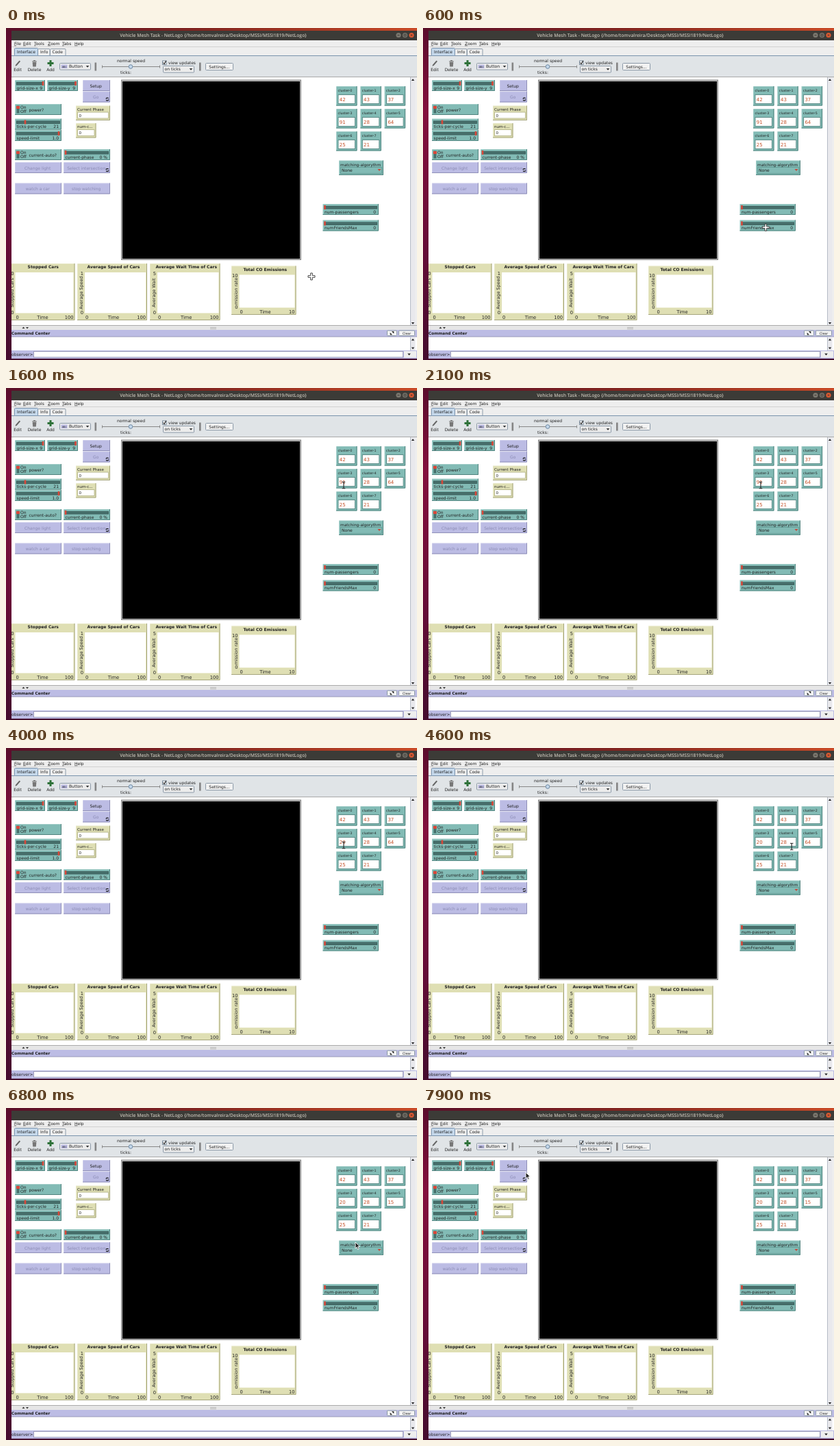
Recreate the animation shown at these times as an HTML page. Size 600x485 px, loop 8000 ms.

```html
<!DOCTYPE html>
<html lang="en">
<head>
<meta charset="utf-8">
<title>Interface</title>
<style>
html, body { margin: 0; width: 100%; height: 100%; overflow: hidden; background: #fff; }
svg { display: block; width: 600px; height: 485px; }
text { font: 6px "DejaVu Sans", sans-serif; fill: #222; text-rendering: geometricPrecision; white-space: pre; }
.title { font: 600 6.75px "Open Sans", sans-serif; fill: #c6c2b7; }
.bold { font-weight: bold; }
.off { fill: #8b8bb4; }
.axis { font-size: 6.7px; }
.side { font-size: 6.4px; }
.monitor { font-size: 5.5px; }
.tiny { font-size: 4.8px; }
.value { font-size: 7px; fill: #c4522a; }
.key { text-decoration: underline; }
</style>
</head>
<body>
<svg id="stage" viewBox="0 0 600 485" xmlns="http://www.w3.org/2000/svg"></svg>
<script>
const LOOP = 8000, STEP = 100;
const TEAL = '#82bbb5', TEAL_DARK = '#4f827d', LILAC = '#bcbce4', SAND = '#dfdfb4';
const stage = document.getElementById('stage');
const out = [];

const rect = (x, y, w, h, fill, more = '') =>
  out.push(`<rect x="${x}" y="${y}" width="${w}" height="${h}" fill="${fill}" ${more}/>`);
const path = (d, fill, more = '') => out.push(`<path d="${d}" fill="${fill}" ${more}/>`);
const line = (d, color, width = 1) => path(d, 'none', `stroke="${color}" stroke-width="${width}"`);
const text = (x, y, str, cls = '', anchor = 'start', more = '') =>
  out.push(`<text x="${x}" y="${y}" class="${cls}" text-anchor="${anchor}" ${more}>${str}</text>`);
const frame = (x, y, w, h, fill, stroke, r = 0) =>
  rect(x + .5, y + .5, w - 1, h - 1, fill, `stroke="${stroke}" rx="${r}"`);

// Raised panel: light upper left edge, dark lower right edge.
function panel(x, y, w, h, fill, dark) {
  rect(x, y, w, h, fill);
  line(`M${x} ${y + .4}H${x + w}M${x + .4} ${y}V${y + h}`, 'rgba(255,255,255,.35)', .8);
  line(`M${x} ${y + h - .5}H${x + w - .5}V${y}`, dark);
}
const triangle = (x, y, s, fill, up) =>
  path(`M${x - s} ${y}h${2 * s}l${-s} ${up ? -s * 1.2 : s * 1.2}z`, fill);

function slider(x, y, w, label, value, knob) {
  panel(x, y, w, 16, TEAL, TEAL_DARK);
  frame(x + 2, y + 3, w - 4, 4.5, '#47706c', '#3c5f5c');
  rect(knob - 1.3, y + 2, 2.6, 6, '#d9483a');
  text(x + 2.5, y + 13.5, label);
  text(x + w - 4, y + 13.5, value, '', 'end');
}

function toggle(x, y, label) {
  panel(x, y, 68, 16, TEAL, TEAL_DARK);
  rect(x + 2.5, y + 2.5, 4, 11, '#47706c');
  rect(x + 2, y + 3, 5, 4, '#d9483a');
  text(x + 8, y + 7, 'On');
  text(x + 8, y + 13, 'Off');
  text(x + 20.5, y + 10.5, label);
}

function button(x, y, w, label, cls = 'off', forever) {
  panel(x, y, w, 16, LILAC, '#8f8fb8');
  text(x + w / 2 - .8, y + 10.6, label, cls, 'middle');
  if (forever) {
    line(`M${x + w - 6} ${y + 11}a2 2 0 0 1 3.6 -.6M${x + w - 2.2} ${y + 12}a2 2 0 0 1 -3.6 .6`, '#111', 1.2);
  }
}

function monitor(x, y, w, label) {
  panel(x, y, w, 21.5, SAND, '#a5a57c');
  frame(x + 2, y + 9, w - 4, 10, '#fff', '#b9b98f');
  text(x + 2, y + 7, label, 'monitor');
  text(x + 4.5, y + 16, '0', 'monitor');
}

const inputSpot = i => [482 + i % 3 * 35.3, 85 + Math.floor(i / 3) * 33];

function input(i, value) {
  const [x, y] = inputSpot(i);
  panel(x, y, 30.5, 28.5, TEAL, TEAL_DARK);
  frame(x + 2.5, y + 12, 25.5, 14, '#fff', '#5c8d88');
  text(x + 2.5, y + 7.5, 'cluster-' + i, 'tiny');
  rect(x + 4.7, y + 15, 9.4, 9.5, '#33446f', `id="mark${i}" visibility="hidden"`);
  text(x + 4.8, y + 22.1, value, 'value', 'start', `id="value${i}"`);
}

// Plot panel; inset is the room left of the white area.
function plot(x, y, w, h, title, label, xMax, yMax, inset) {
  const left = x + inset, right = x + w - 2, top = y + 13, bottom = y + h - 10.5;
  panel(x, y, w, h, SAND, '#a5a57c');
  rect(left, top, right - left, bottom - top, '#fff');
  text(x + w / 2 + 2, y + 7.4, title, 'bold', 'middle');
  text(left + 1, y + h - 2.5, '0', 'axis');
  text((left + right) / 2 - 2.5, y + h - 2.5, 'Time', 'axis', 'middle');
  text(right, y + h - 2.5, xMax, 'axis', 'end');
  text(left - 2, top + 3.8, yMax, 'axis', 'end');
  text(left - 2, bottom + 1, '0', 'axis', 'end');
  const tx = left - 3, ty = (top + bottom) / 2;
  text(tx, ty, label, 'side', 'middle', `transform="rotate(-90 ${tx} ${ty})"`);
}

function desktop() {
  out.push(`<defs><linearGradient id="wall" x2="0" y2="1"><stop stop-color="#5a0c2c"/>
    <stop offset=".25" stop-color="#840f3c"/><stop offset=".6" stop-color="#6c0d38"/>
    <stop offset="1" stop-color="#450b2e"/></linearGradient>
    <linearGradient id="sky"><stop stop-color="#5a0f29"/><stop offset=".5" stop-color="#84261f"/>
    <stop offset="1" stop-color="#c84a27"/></linearGradient>
    <clipPath id="win"><path d="M8 0H600V485H8z"/></clipPath></defs>`);
  rect(0, 0, 600, 485, 'url(#wall)');
  rect(0, 0, 600, 4, 'url(#sky)');
  rect(8, 4, 592, 14, '#3c3b37');
  text(302.5, 13.2, 'Vehicle Mesh Task - NetLogo {/home/tomvalreira/Desktop/MSSI/MSSI1819/NetLogo}', 'title', 'middle');
  [['#7b776e', 573], ['#7b776e', 582.5], ['#df5a31', 592]].forEach(([color, x]) =>
    out.push(`<circle cx="${x}" cy="10.5" r="3.6" fill="${color}"/>`));
  line('M571.5 10.5h3M581 9h3v3h-3zM590.7 9.2l2.6 2.6m0-2.6l-2.6 2.6', '#33322e', .8);
}

function toolbar() {
  rect(8, 18, 592, 23, '#eee');
  rect(8, 41, 592, 31, '#e0e4e7');
  [['File', 12], ['Edit', 25], ['Tools', 41], ['Zoom', 61], ['Tabs', 82], ['Help', 100]].forEach(([s, x]) =>
    text(x, 24.6, `<tspan class="key">${s[0]}</tspan>${s.slice(1)}`));
  line('M8 27.5H600', '#d2d2d2');
  frame(46, 30, 18.5, 11, '#f0f0f0', '#8c9aa8', 1);
  frame(64, 30, 23.5, 11, '#f0f0f0', '#8c9aa8', 1);
  line('M8 40.5H600', '#7a93ad');
  frame(12, 29, 35, 12, '#c6d9ec', '#7a93ad', 1);
  text(16, 37, 'Interface');
  text(50, 37, 'Info');
  text(67.5, 37, 'Code');

  path('M13.5 56l.8-2.6 5.2-6 1.6 1.4-5.2 6z', '#666');
  path('M38 48h7v.8h-7zM40 47h3v1h-3zM38.6 49.6h5.8l-.6 7h-4.6z', '#777');
  path('M63.5 47h3v3h3v3h-3v3h-3v-3h-3v-3h3z', '#2d7138');
  text(17, 63.2, 'Edit', '', 'middle');
  text(41.5, 63.2, 'Delete', '', 'middle');
  text(65, 63.2, 'Add', '', 'middle');
  frame(78, 51, 46, 10.5, '#ececec', '#8c9aa8', 1);
  rect(80.5, 53.5, 9, 5.5, LILAC);
  text(85, 57.6, 'abc', 'tiny', 'middle', 'style="font-size:4px"');
  text(92, 58.4, 'Button');
  triangle(119, 55, 2.3, '#333');
  rect(129.5, 50.5, 2.6, 12, '#858585');
  rect(282, 50.5, 2.6, 12, '#858585');
  text(182.5, 50, 'normal speed', '', 'middle');
  line('M140 56.5H225M140.5 54.5v4M224.5 54.5v4', '#888');
  out.push('<circle cx="182" cy="56.5" r="2.8" fill="#c3d7ea" stroke="#66829e" stroke-width=".9"/>');
  text(175, 67, 'ticks:', '', 'middle');
  frame(228, 47.5, 6.5, 6.5, '#f8f8f8', '#78899a');
  line('M229.4 50.5l1.6 2 2.8-4.6', '#222', 1.1);
  text(237, 53, 'view updates');
  frame(229, 55, 46, 10.5, '#ececec', '#8c9aa8', 1);
  text(231.5, 62.4, 'on ticks');
  triangle(270, 59, 2.3, '#333');
  frame(291, 51, 41, 11, '#f2f2f2', '#8c9aa8', 1);
  text(311.5, 58.8, 'Settings...', '', 'middle');
}

function widgets() {
  rect(8, 71.5, 583, 363, '#fff');
  line('M8 71.5H600', '#a9a9a9');
  slider(13, 76, 44, 'grid-size-x', '9', 54);
  slider(60, 76, 45, 'grid-size-y', '9', 101.5);
  button(112, 76, 40, 'Setup', '');
  button(112, 92.5, 40, 'Go', 'off', true);
  toggle(13, 111, 'power?');
  monitor(102, 113.5, 50, 'Current Phase');
  slider(13, 132.5, 68, 'ticks-per-cycle', '21', 28);
  monitor(102, 139, 29.5, 'num-c...');
  slider(13, 149, 68, 'speed-limit', '1.0', 77);
  toggle(13, 177, 'current-auto?');
  slider(84, 177, 68, 'current-phase', '0 %', 87);
  button(13, 196, 68, 'Change light');
  button(84, 196, 68, 'Select intersection', 'off', true);
  button(13, 226.5, 68, 'watch a car');
  button(84, 226.5, 68, 'stop watching');

  frame(168, 75.5, 263, 263.5, '#b9b9b9', '#858585');
  rect(170, 78, 259, 259, '#000');

  [42, 43, 37, 91, 28, 64, 25, 21].forEach((v, i) => input(i, v));
  panel(486, 193.5, 65, 21.5, TEAL, TEAL_DARK);
  frame(488, 203, 61, 10, TEAL, '#649c96');
  text(488, 201.5, 'matching-algorythm', '', 'start', 'style="font-size:5.8px"');
  text(490, 210.2, 'None');
  triangle(545, 206, 2.5, '#c8483c');
  slider(462.5, 257, 81.5, 'num-passengers', '0', 465.5);
  slider(462.5, 280.5, 81.5, 'numFriendsMax', '0', 465.5);

  out.push('<g clip-path="url(#win)">');
  plot(4, 344, 96.5, 83, 'Stopped Cars', 'Stopped Cars', '100', '60', 9.5);
  out.push('</g>');
  plot(104, 344, 102, 83, 'Average Speed of Cars', 'Average Speed', '100', '1', 11);
  plot(210, 344, 102.5, 83, 'Average Wait Time of Cars', 'Average Wait', '100', '5', 11);
  plot(329, 347.5, 94.5, 71.5, 'Total CO Emissions', 'mission rate', '10', '10', 11.5);
}

function scrollbar(top, bottom) {
  rect(590, top, 7.5, bottom - top, '#e9e9ed');
  line(`M590.5 ${top}V${bottom}`, '#b5bcc6');
  triangle(594, top + 5, 2.2, '#222', true);
  triangle(594, bottom - 5, 2.2, '#222');
}

function commandCenter() {
  rect(590, 72, 10, 363, '#eee');
  scrollbar(72, 435);
  rect(8, 434.5, 592, 7, '#e6e6e6');
  line('M8 434.5H600', '#aaa');
  triangle(25.5, 439, 2, '#333', true);
  triangle(31, 437, 2, '#333');
  line('M298 437.5h9M298 439.5h9', '#aaa', .8);
  rect(8, 441, 592, 10, LILAC);
  text(8, 448.4, 'Command Center', 'bold', 'start', 'style="font-size:5.8px"');
  frame(556, 441.5, 15, 8.5, '#f4f4f4', '#8c9aa8', 1);
  path('M561 448v-2.4l2.4 2.4zM566 443.5v2.4l-2.4-2.4z', '#222', 'stroke="#222" stroke-width=".6"');
  frame(573, 441.5, 24, 8.5, '#f4f4f4', '#8c9aa8', 1);
  text(585, 447.5, 'Clear', 'tiny', 'middle');
  rect(8, 451, 592, 20.5, '#fff');
  line('M8 451H600', '#8e8eae', .8);
  scrollbar(451.5, 471.5);
  rect(8, 471, 592, 12, LILAC);
  frame(40, 472, 540, 9.5, '#fff', '#9a9ab8');
  text(8, 479, 'observer>');
  rect(581, 472, 18, 9.5, '#eee');
  triangle(588.5, 475.5, 2.3, '#222');
}

function cursors() {
  out.push(`<g id="cursor">
    <path id="cross" d="M-1.3 -5h2.6v3.7h3.7v2.6h-3.7v3.7h-2.6v-3.7h-3.7v-2.6h3.7z" fill="#fff" stroke="#333" stroke-width=".9"/>
    <path id="beam" d="M-2.3 -4.8H-.6L0 -4.3 .6 -4.8H2.3M0 -4.3V4.3M-2.3 4.8H-.6L0 4.3 .6 4.8H2.3" fill="none" stroke="#222" stroke-width="1.1"/>
    <path id="arrow" d="M0 0V9.2L2.1 7.2 3.6 10.6 5.2 9.9 3.7 6.6H6.6z" fill="#222" stroke="#fff" stroke-width=".9"/>
  </g>`);
}

desktop();
toolbar();
widgets();
commandCenter();
cursors();
stage.innerHTML = out.join('');

// Pointer stops: time, x, y.
const route = [
  [0, 446, 363], [200, 446, 363], [500, 480, 322], [800, 541, 230], [1100, 501, 147], [1200, 495, 141],
  [1300, 493, 142], [4100, 493, 142], [4400, 513, 146], [4900, 576, 141], [5100, 565, 138], [6500, 565, 138],
  [6600, 556, 148], [6800, 510, 196], [7100, 394, 292], [7200, 361, 275], [7300, 361, 275],
  [7600, 240, 168], [7800, 165, 106], [7900, 150, 94], [8000, 150, 94]
];
const edits = [
  { id: 3, select: [2700, 3300], typed: [[0, '91'], [3300, ''], [3500, '2'], [4000, '20']] },
  { id: 5, select: [5400, 6200], typed: [[0, '64'], [6200, '1'], [6300, '15']] }
];
// Areas as left, top, right, bottom where the pointer is an arrow.
const solid = [[486, 193, 551, 215], [168, 75, 431, 339], [112, 76, 152, 108], [84, 177, 152, 212], [102, 113, 152, 135]];
const inside = (x, y, [l, t, r, b]) => x >= l && x <= r && y >= t && y <= b;
const el = id => document.getElementById(id);

function pointerAt(t) {
  const i = route.findIndex(stop => stop[0] > t);
  const [t0, x0, y0] = route[i - 1], [t1, x1, y1] = route[i];
  const k = (t - t0) / (t1 - t0);
  return [x0 + (x1 - x0) * k, y0 + (y1 - y0) * k];
}

function shapeAt(x, y) {
  for (let i = 0; i < 8; i++) {
    const [l, t] = inputSpot(i);
    if (inside(x, y, [l + 2, t + 12, l + 28, t + 26])) return 'beam';
    if (inside(x, y, [l, t, l + 30.5, t + 28.5])) return 'arrow';
  }
  return solid.some(area => inside(x, y, area)) ? 'arrow' : 'cross';
}

function draw(now) {
  const t = Math.floor(Math.max(0, now - start) % LOOP / STEP) * STEP;
  const [x, y] = pointerAt(t), shape = shapeAt(x, y);
  el('cursor').setAttribute('transform', `translate(${x} ${y})`);
  for (const id of ['cross', 'beam', 'arrow']) el(id).style.display = id === shape ? '' : 'none';
  for (const { id, select, typed } of edits) {
    const marked = t >= select[0] && t < select[1];
    el('mark' + id).setAttribute('visibility', marked ? 'visible' : 'hidden');
    el('value' + id).style.fill = marked ? '#dfe4f0' : '';
    el('value' + id).textContent = typed.filter(step => step[0] <= t).pop()[1];
  }
  requestAnimationFrame(draw);
}
const start = performance.now();
draw(start);
</script>
</body>
</html>
```
